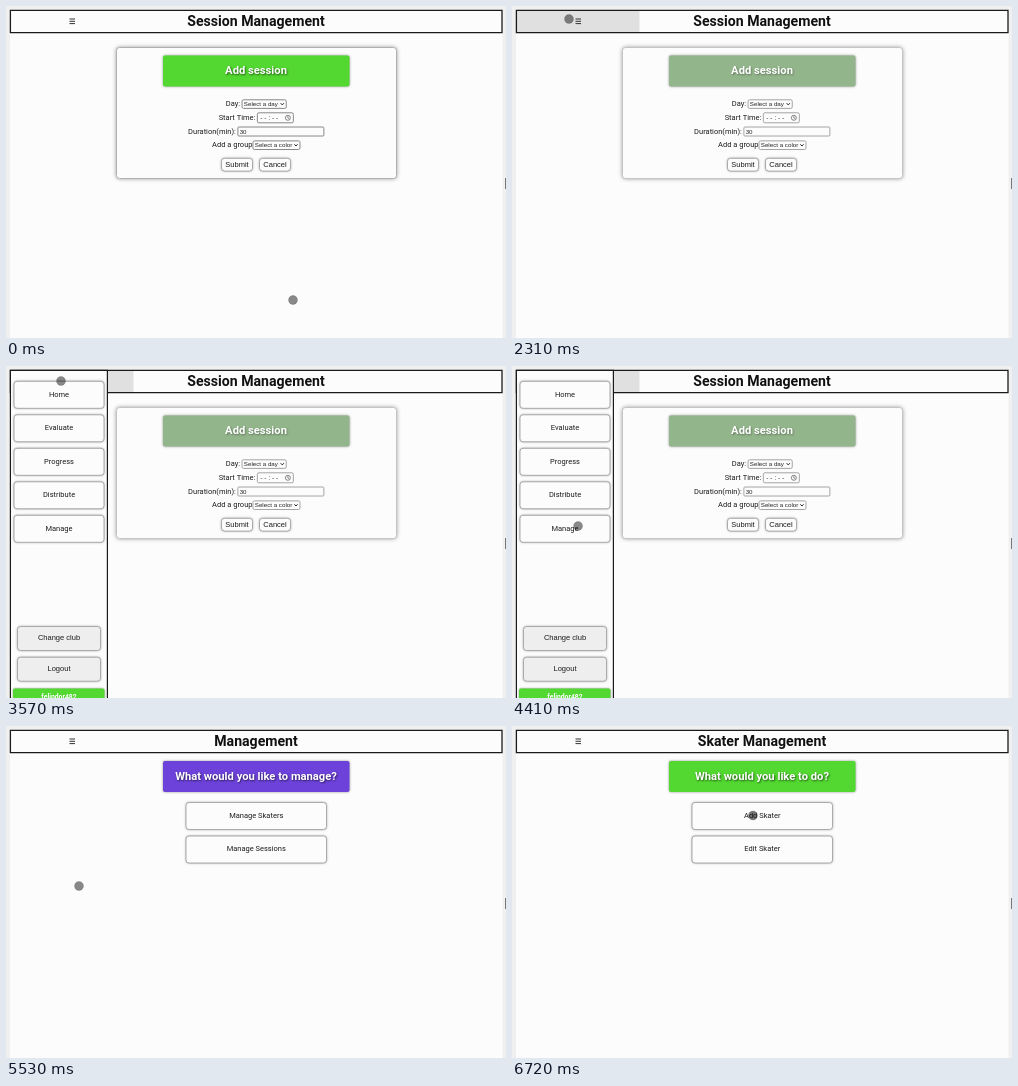
Recreate the animation shown at these times as an HTML page with a canvas. Size 500 px wide and 332 px high, loop 8 s.

```html
<!DOCTYPE html>
<html lang="en">
<head>
<meta charset="utf-8">
<title>Session Management</title>
<style>
html, body { margin: 0; width: 100%; height: 100%; overflow: hidden; background: #f0f0f0; }
canvas { display: block; width: 500px; height: 332px; }
</style>
</head>
<body>
<canvas id="stage" width="500" height="332"></canvas>
<script>
const ctx = document.getElementById('stage').getContext('2d');
const LOOP = 8000, STEP = 70, MID = 250;
const PAPER = '#fcfcfc', INK = '#1c1c1c', BLACK = '#1a1a1a';
const GREEN = '#52d830', PALE = '#93b58b', PURPLE = '#6d42da';
const ROBOTO = 'Roboto, sans-serif';
const ARIAL = '"Liberation Sans", Arial, sans-serif';

const at = {
  menuTap: 2310, slide: 2450, manageTap: 4830,
  manage: 4900, closed: 5040, skaters: 6720
};

// Pointer strokes: time span and end point, each starting where the last ended.
const home = { x: 287, y: 294 };
const strokes = [
  { from: 310, to: 560, x: 177, y: 150 },
  { from: 840, to: 910, x: 120, y: 99 },
  { from: 1050, to: 1610, x: 57, y: 13 },
  { from: 3500, to: 3570, x: 55, y: 15 },
  { from: 3640, to: 4060, x: 72, y: 125 },
  { from: 4130, to: 4480, x: 65.5, y: 163.5 },
  { from: 5250, to: 5530, x: 73, y: 160 },
  { from: 5530, to: 6300, x: 241, y: 89.5 }
];

const clamp = v => Math.min(1, Math.max(0, v));
const easeOut = p => 1 - (1 - p) ** 1.5;

function text(str, x, y, font, color = INK, align = 'center') {
  ctx.font = font;
  ctx.fillStyle = color;
  ctx.textAlign = align;
  ctx.fillText(str, x, y);
}

function rect(x, y, w, h, color) {
  ctx.fillStyle = color;
  ctx.fillRect(x, y, w, h);
}

function stroke(color, width) {
  ctx.strokeStyle = color;
  ctx.lineWidth = width;
  ctx.stroke();
}

function box(x, y, w, h, r, fill, line, blur = 0) {
  ctx.save();
  ctx.beginPath();
  ctx.roundRect(x, y, w, h, r);
  if (blur) {
    ctx.shadowColor = 'rgba(0,0,0,.45)';
    ctx.shadowBlur = blur;
  }
  ctx.fillStyle = fill;
  ctx.fill();
  ctx.shadowColor = 'transparent';
  if (line) stroke(line, 1);
  ctx.restore();
}

function button(label, x, y, w, h, { fill = PAPER, font = ROBOTO, color } = {}) {
  box(x, y, w, h, 3, fill, '#aaa', 2.5);
  text(label, x + w / 2, y + h / 2 + 1.9, '7.5px ' + font, color);
}

function banner(label, y, color) {
  box(157, y, 186.5, 31, 2, color, null, 2.5);
  ctx.save();
  ctx.shadowColor = color === PALE ? 'rgba(0,0,0,.35)' : 'rgba(0,0,0,.6)';
  ctx.shadowBlur = 2;
  ctx.shadowOffsetX = ctx.shadowOffsetY = 0.8;
  text(label, MID, y + 18.9, 'bold 11.2px ' + ROBOTO, '#fff');
  ctx.restore();
}

function header(title, tapped) {
  if (tapped) rect(4, 4, 123.5, 22.5, '#e0e0e0');
  ctx.beginPath();
  ctx.rect(4.4, 4.3, 491.6, 22.3);
  stroke(BLACK, 1.3);
  for (let i = 0; i < 3; i++) rect(63.5, 12.5 + i * 2.3, 5.5, 1, '#333');
  text(title, MID, 20, 'bold 14.1px ' + ROBOTO, '#111');
}

function select(label) {
  return (x, y, w, h, line) => {
    box(x, y, w, h, 1.5, PAPER, line);
    text(label, x + 1.8, y + 6.5, '6.2px ' + ARIAL, '#222', 'left');
    ctx.beginPath();
    ctx.moveTo(x + w - 5.6, y + 3.4);
    ctx.lineTo(x + w - 4, y + 5.1);
    ctx.lineTo(x + w - 2.4, y + 3.4);
    stroke('#222', 1);
  };
}

function timeInput(x, y, w, h, line) {
  box(x, y, w, h, 1.5, PAPER, line);
  text('- - : - -', x + 3, y + 7.2, '6.6px ' + ARIAL, '#444', 'left');
  const cx = x + w - 5.5, cy = y + h / 2;
  ctx.beginPath();
  ctx.arc(cx, cy, 2.5, 0, 7);
  ctx.moveTo(cx, cy - 1.6);
  ctx.lineTo(cx, cy + 0.2);
  ctx.lineTo(cx + 1.3, cy + 0.7);
  stroke('#555', 0.7);
}

function numberInput(x, y, w, h, line) {
  box(x, y, w, h, 1, PAPER, line);
  text('30', x + 1.8, y + 6.6, '6.2px ' + ARIAL, '#222', 'left');
}

const rows = [
  { label: 'Day:', gap: 2, w: 44.2, h: 8.6, field: select('Select a day') },
  { label: 'Start Time:', gap: 2, w: 36, h: 10, field: timeInput },
  { label: 'Duration(min):', gap: 2, w: 86, h: 9, field: numberInput },
  { label: 'Add a group', gap: 0.5, w: 47, h: 8.6, field: select('Select a color') }
];

function sessionPage(dim) {
  header('Session Management', dim);
  box(110.5, 41.5, 280, 131, 3, PAPER, dim ? '#c4c4c4' : '#b0b0b0', 4);
  banner('Add session', 49.5, dim ? PALE : GREEN);
  rows.forEach(({ label, gap, w, h, field }, i) => {
    const font = '7.5px ' + ROBOTO;
    ctx.font = font;
    const labelW = ctx.measureText(label).width + gap;
    const left = MID - (labelW + w) / 2;
    text(label, left, 100.3 + i * 13.7, font, INK, 'left');
    field(left + labelW, 98.1 + i * 13.7 - h / 2, w, h, dim ? '#a4a4a4' : '#888');
  });
  ['Submit', 'Cancel'].forEach((name, i) =>
    button(name, 215.5 + i * 38, 152.3, 31, 12.8, { font: ARIAL }));
}

function choicePage(title, question, color, choices, ink) {
  header(title, false);
  banner(question, 35, color);
  choices.forEach((c, i) => button(c, 180, 76.5 + i * 33.5, 140.5, 27, { color: ink }));
}

function sidebar(shift, tapped) {
  ctx.save();
  ctx.translate(shift, 0);
  rect(4, 4, 98, 328, PAPER);
  ctx.beginPath();
  ctx.rect(4.4, 4.3, 97, 340);
  stroke(BLACK, 1.2);
  ['Home', 'Evaluate', 'Progress', 'Distribute', 'Manage'].forEach((name, i) => {
    const style = tapped && name === 'Manage' ? { fill: '#9fcbe2', color: '#456' } : {};
    button(name, 8, 15.3 + i * 33.5, 90, 27, style);
  });
  ['Change club', 'Logout'].forEach((name, i) =>
    button(name, 11.5, 260.5 + i * 30.7, 83, 24, { fill: '#eee', font: ARIAL }));
  box(7, 322.5, 91.5, 20, 2, GREEN, null, 2);
  text('felindor482', 53, 333, 'bold 6.8px ' + ROBOTO, '#fff');
  ctx.restore();
}

function pointer(t) {
  let { x, y } = home;
  for (const s of strokes) {
    const p = easeOut(clamp((t - s.from) / (s.to - s.from)));
    x += (s.x - x) * p;
    y += (s.y - y) * p;
  }
  const pressed = t >= at.skaters || (t >= at.manageTap && t < at.closed);
  ctx.beginPath();
  ctx.arc(x, y, 4.5, 0, 7);
  ctx.fillStyle = `rgba(20,20,20,${pressed ? 0.58 : 0.5})`;
  ctx.fill();
  stroke('rgba(60,60,60,.25)', 0.8);
}

function draw(t) {
  rect(0, 0, 500, 332, '#f0f0f0');
  rect(4, 4, 492.5, 328, PAPER);
  rect(499, 172, 1, 11, '#777');

  if (t < at.manage) {
    sessionPage(t >= at.menuTap);
  } else if (t < at.skaters) {
    const dim = t < at.closed;
    choicePage('Management', 'What would you like to manage?', dim ? PALE : PURPLE,
      ['Manage Skaters', 'Manage Sessions'], dim ? '#555' : INK);
  } else {
    choicePage('Skater Management', 'What would you like to do?', GREEN,
      ['Add Skater', 'Edit Skater']);
  }

  if (t >= at.slide && t < at.closed) {
    const hidden = 1 - clamp((t - at.slide + STEP) / (2 * STEP));
    sidebar(-98 * hidden, t >= at.manageTap);
  }
  pointer(t);
}

const start = performance.now();
function tick() {
  const t = (performance.now() - start) % LOOP;
  draw(Math.floor(t / STEP) * STEP);
  requestAnimationFrame(tick);
}
tick();
</script>
</body>
</html>
```
